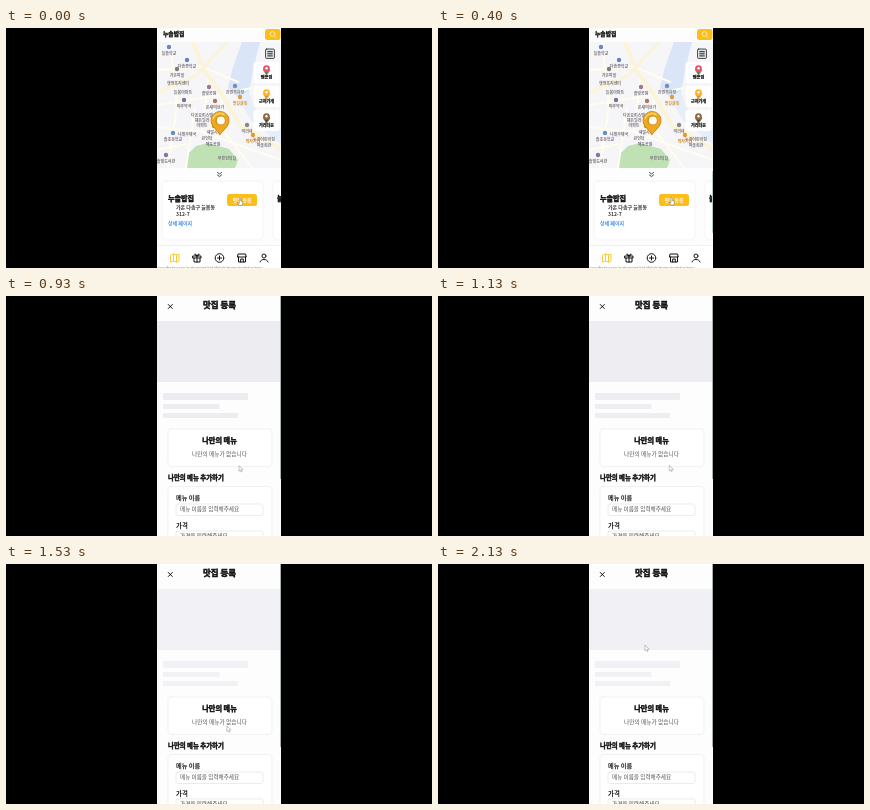
Write an HTML page with a canvas that moves like this. It is 426 px wide and 240 px high and loops after 2190 ms.

```html
<!DOCTYPE html>
<html lang="ko">
<head>
<meta charset="utf-8">
<style>
html, body { margin: 0; width: 100%; height: 100%; overflow: hidden; background: #000; }
canvas { display: block; width: 100vw; height: 100vh; }
</style>
</head>
<body>
<canvas id="stage"></canvas>
<script>
const W = 426, H = 240, LOOP = 2190, SWITCH = 800;
const canvas = document.getElementById('stage');
const ctx = canvas.getContext('2d');
const FONT = '"Noto Sans CJK KR", "Noto Sans CJK", sans-serif';
const GOLD = '#fdbe18', INK = '#111';

function rect(x, y, w, h, color) {
  ctx.fillStyle = color;
  ctx.fillRect(x, y, w, h);
}
function box(x, y, w, h, r, fill, line) {
  ctx.beginPath();
  ctx.roundRect(x, y, w, h, r);
  if (fill) { ctx.fillStyle = fill; ctx.fill(); }
  if (line) { ctx.strokeStyle = line; ctx.lineWidth = 0.7; ctx.stroke(); }
}
function dot(x, y, r, color) {
  ctx.beginPath();
  ctx.arc(x, y, r, 0, 7);
  ctx.fillStyle = color;
  ctx.fill();
}
function text(str, x, y, size, weight = 400, color = INK, align = 'left') {
  ctx.font = `${weight} ${size}px ${FONT}`;
  ctx.textAlign = align;
  ctx.textBaseline = 'middle';
  ctx.fillStyle = color;
  ctx.fillText(str, x, y);
  // thicken headings to a heavy display weight
  if (weight === 900) {
    ctx.strokeStyle = color;
    ctx.lineWidth = size * 0.06;
    ctx.lineJoin = 'round';
    ctx.strokeText(str, x, y);
  }
}
function path(d, color, width, fill) {
  const p = new Path2D(d);
  if (fill) { ctx.fillStyle = fill; ctx.fill(p); }
  if (color) {
    ctx.strokeStyle = color;
    ctx.lineWidth = width;
    ctx.lineCap = ctx.lineJoin = 'round';
    ctx.stroke(p);
  }
}
function at(x, y, draw) {
  ctx.save();
  ctx.translate(x, y);
  draw();
  ctx.restore();
}

function mainPin(x, y) {
  at(x, y, () => {
    path('M0 11C-2 7-9 3-9-3A9 9 0 0 1 9-3C9 3 3 7 0 11Z', '#c98a1c', 1, '#f0a91f');
    path('M-7-5A7.5 7.5 0 0 1 4-9', '#ffd35c', 1.5);
    dot(0.5, -3, 5, '#c98a1c');
    dot(0.8, -3, 4, '#fffdf6');
  });
}
function badge(x, y, top, tip) {
  at(x, y, () => {
    path('M0 5L-3.2 0H3.2Z', tip, 0.6, tip);
    dot(0, -1.4, 3.4, top);
    dot(0, -1.8, 1.2, '#fff');
  });
}

const places = [
  ['늘솔학교', 163, 25, '#6686c8'], ['다솜중학교', 181, 38, '#5b83cf'],
  ['가온마을', 171, 47, '#7d7b83'], ['행정복지센터', 172, 55, ''],
  ['늘봄아파트', 177, 64, ''], ['솔빛공원', 203, 65, '#9c7b92'],
  ['강변주차장', 229, 64, '#6e91c5'], ['마루약국', 178, 78, '#7a718e'],
  ['온새미상가', 209, 79, '#a47a5b'], ['맛길골목', 234, 75, '#e49a34'],
  ['다온오피스텔', 196, 87, ''], ['해든빌라', 196, 92, ''], ['아파트', 196, 97, ''],
  ['나래우체국', 181, 106, ''], ['솔초등학교', 167, 111, '#668bd0'],
  ['미리내', 241, 103, '#888'], ['먹자거리', 247, 113, '#e49a34'],
  ['누리어린이집', 258, 111, ''], ['마을회관', 258, 117, ''],
  ['새결시장', 208, 104, '#d88a38'], ['큰언덕', 201, 110, ''],
  ['체육공원', 207, 116, ''], ['푸른언덕길', 221, 130, ''],
  ['솔빛도서관', 160, 133, '#8476a2']
];

function drawMap() {
  ctx.save();
  ctx.beginPath();
  ctx.rect(151, 14, 124, 126);
  ctx.clip();
  rect(151, 14, 124, 126, '#f6f5f7');
  path('M236 14H254L247 42L243 64L231 68L222 60L226 42Z', null, 0, '#dae6f8');
  path('M243 64L250 82L275 100V116L246 94L231 68Z', null, 0, '#e6eef9');
  path('M182 126L190 118L202 115L223 121L232 132L229 140H180Z', null, 0, '#bfe1b3');
  path('M151 42L197 39L232 54M151 77L214 67L245 60M151 99L196 104L275 132M164 14L171 78L162 140'
    + 'M215 67L220 106L246 140M189 80L180 140M151 122L180 116M203 46L196 104', '#fffdf0', 2);
  path('M187 14L198 42L216 67L234 97L275 121', '#fbf4d8', 4);
  path('M151 65L190 48L221 14', '#fbf4d8', 3);
  for (const [name, x, y, color] of places) {
    text(name, x, y, 4, 700, color === '#e49a34' ? '#d68b29' : '#76737c', 'center');
    if (color) dot(x, y - 6, 2.2, color);
  }
  ctx.restore();
  mainPin(214, 95.5);

  box(259.5, 21, 9, 9.5, 1.2, '#dadde2', INK);
  path('M261.8 23.7H266.3M261.8 25.8H266.3M261.8 27.9H266.3', INK, 0.9);
  ['찜꽁집', '근처가게', '거리타운'].forEach((label, i) => {
    const y = 34 + i * 24;
    box(247.5, y, 26, 21, 2, '#fff');
    badge(260.5, y + 8, ['#e8546a', '#f7b62c', '#8d6b3c'][i], ['#6d7466', '#d9972a', '#4d4b38'][i]);
    text(label, 260.5, y + 15.5, 4.1, 900, INK, 'center');
  });
}

function drawNav() {
  rect(151, 217, 124, 23, '#fff');
  rect(151, 217, 124, 0.6, '#e6e6e6');
  at(169, 230, () => path('M-4-3L-1.5-4L1.5-3L4-4V3L1.5 4L-1.5 3L-4 4ZM-1.5-4V3M1.5-3V4', '#fccb2e', 1));
  at(191, 230, () => path('M-4-2H4V0H-4ZM-3 0V4H3V0M0-2V4M0-2C-4-3-2-6 0-2C2-6 4-3 0-2', INK, 1));
  at(213.5, 230, () => path('M4.3 0A4.3 4.3 0 1 1-4.3 0A4.3 4.3 0 1 1 4.3 0M-2 0H2M0-2V2', INK, 1));
  at(236, 230, () => path('M-3.5-4H3.5L4.3-1H-4.3ZM-3.5-1V4H3.5V-1M-1.3 4V1H1.3V4', INK, 1));
  at(258, 230, () => path('M2-2A2 2 0 1 1-2-2A2 2 0 1 1 2-2M-4 4C-3.5 .5 3.5 .5 4 4', INK, 1));
  text('localhost:3000/restaurant/list/detail/menu/register/new', 152, 240, 4, 400, '#777');
}

function drawHome(t) {
  text('누솔밥집', 157, 6, 5.8, 900);
  box(259, 1, 15.5, 11, 2.5, GOLD);
  path('M269 6A2.5 2.5 0 1 1 264 6A2.5 2.5 0 1 1 269 6M268.3 7.8L270 9.5', '#fff3cc', 0.8);
  drawMap();
  path('M211.5 144.5L213.5 146L215.5 144.5M211.5 147L213.5 148.5L215.5 147', '#333', 0.9);
  box(156, 153, 101, 59, 5, '#fff', '#f0f0f3');
  box(267, 153, 101, 59, 5, '#fff', '#f0f0f3');
  text('누솔밥집', 162, 170, 7.1, 900);
  text('가온 다솜구 늘봄동', 170, 179.5, 5, 700, '#333');
  text('312-7', 170, 186, 5, 700, '#333');
  text('상세 페이지', 162, 195, 5, 700, '#3d8be8');
  box(221, 166, 30, 12, 2.5, GOLD);
  text('맛집 등록', 236, 172, 4.8, 600, '#fff', 'center');
  text('늘', 271, 170, 7.1, 900);
  drawNav();
  if (t >= 70) rect(274, 143, 1, 62, '#b7cfc0');
}

function drawForm(t) {
  path('M162.3 8.5L166.3 12.5M166.3 8.5L162.3 12.5', INK, 1);
  text('맛집 등록', 213.5, 9, 8.5, 900, INK, 'center');
  const glow = (1 - Math.cos((t - 930) / 870 * Math.PI)) / 2;
  const tone = `rgb(${236 + 7 * glow},${236 + 6 * glow},${241 + 6 * glow})`;
  rect(151, 25, 124, 61, tone);
  box(157, 97, 85, 7, 1, tone);
  box(157, 108, 56.5, 5, 1, tone);
  box(157, 117, 75, 5, 1, tone);

  box(162, 133, 104, 37.5, 3, '#fff', '#ededf1');
  text('나만의 메뉴', 213.5, 144.5, 7.2, 900, INK, 'center');
  text('나만의 메뉴가 없습니다', 213.5, 157.5, 5.7, 500, '#555', 'center');
  text('나만의 메뉴 추가하기', 162, 182, 6.4, 900);
  box(162, 190.5, 104, 70, 3, '#fff', '#ededf1');
  text('메뉴 이름', 170, 202, 6.2, 700, '#222');
  box(170, 208, 87, 11.5, 2, '#fff', '#e2e2e8');
  text('메뉴 이름을 입력해주세요', 174, 213, 5.6, 500, '#555');
  text('가격', 170, 230, 6.4, 700, '#222');
  box(170, 235, 87, 11.5, 2, '#fff', '#e2e2e8');
  text('가격을 입력해주세요', 174, 240, 5.6, 500, '#444');
  rect(274, 0, 1, 183, '#a9b0b2');
}

const track = [[0, 234, 171], [930, 233, 170], [1330, 229.5, 169.5], [1800, 207.5, 151], [2130, 207, 81.5], [2190, 207, 80]];
function pointer(t) {
  const i = track.findIndex(p => p[0] > t);
  const a = track[i - 1], b = track[i];
  const k = (t - a[0]) / (b[0] - a[0]);
  const u = k * k * (3 - 2 * k);
  at(a[1] + (b[1] - a[1]) * u, a[2] + (b[2] - a[2]) * u, () => {
    if (t < SWITCH) {
      path('M-.7 4V-.5Q0-1.3.7-.5V2L2.8 2.7V5L2 6.5H-.8L-2.5 4Z', '#666', 0.5, '#fff');
    } else {
      path('M0 0V5.2L1.2 4.2L2.1 6L3 5.6L2.2 3.8H3.7Z', '#888', 0.5, '#fff');
    }
  });
}

function frame(now) {
  const t = now % LOOP;
  const w = Math.round(innerWidth * devicePixelRatio), h = Math.round(innerHeight * devicePixelRatio);
  if (canvas.width !== w || canvas.height !== h) {
    canvas.width = w;
    canvas.height = h;
  }
  ctx.setTransform(w / W, 0, 0, h / H, 0, 0);
  rect(0, 0, W, H, '#000');
  ctx.save();
  ctx.beginPath();
  ctx.rect(151, 0, 124, 240);
  ctx.clip();
  rect(151, 0, 124, 240, '#fdfdfe');
  if (t < SWITCH) drawHome(t);
  else drawForm(t);
  pointer(t);
  ctx.restore();
}

const start = performance.now();
function tick() {
  frame(performance.now() - start);
  requestAnimationFrame(tick);
}
tick();
</script>
</body>
</html>
```
